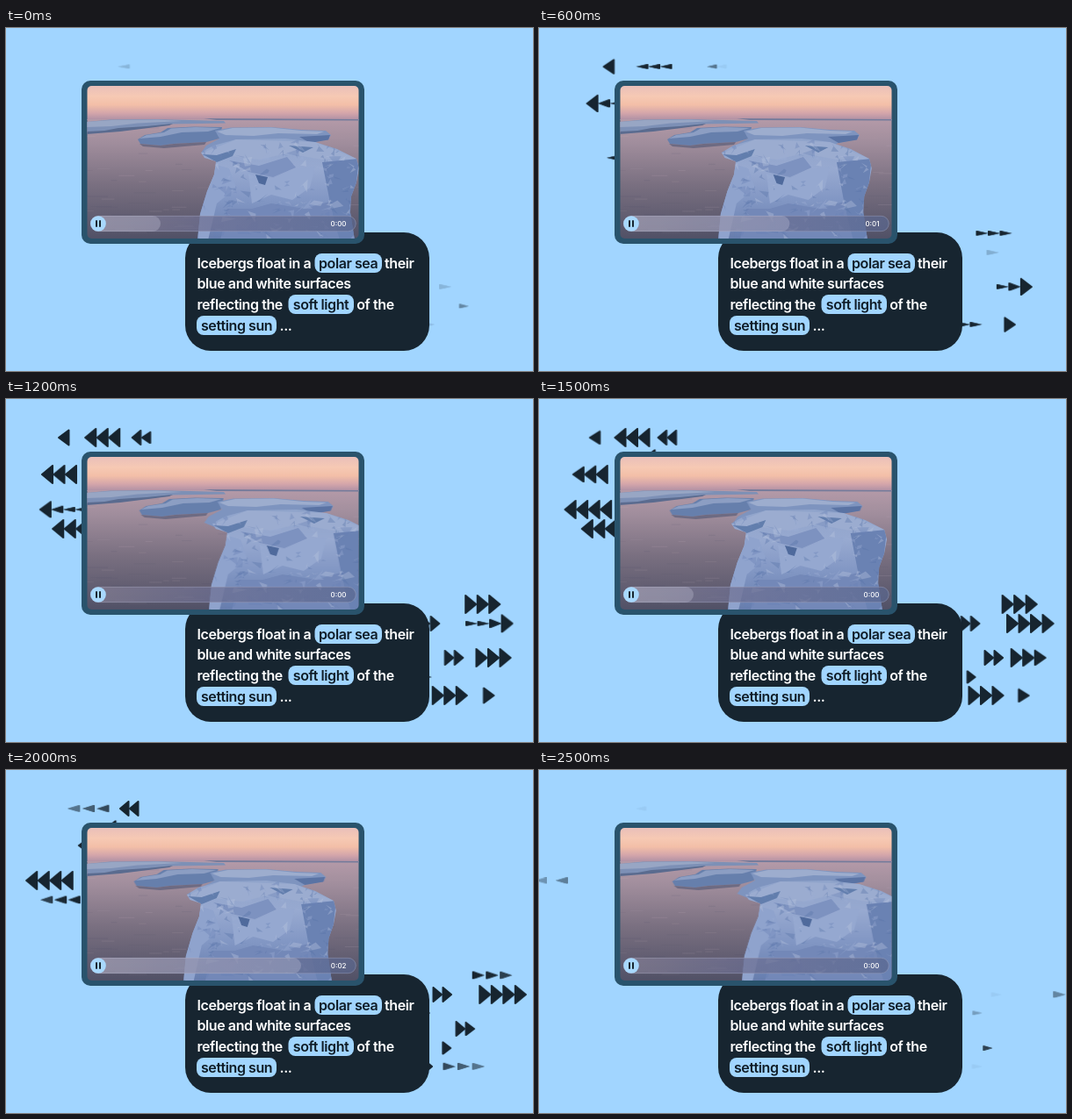
An HTML page that plays this animation: 600x391 px, repeating every 2600 ms.

```html
<!DOCTYPE html>
<html lang="en">
<head>
<meta charset="utf-8">
<title>Polar sea caption</title>
<style>
html, body { margin: 0; width: 100%; height: 100%; overflow: hidden; background: #a1d5ff; }
svg { display: block; width: 100vw; height: 100vh; }

/* arrows: each row glides to rest while its triangles open, then they close and leave */
.glide, .enter, .leave { animation: 2600ms linear infinite; }
.glide { animation-name: glide; }
.leave { animation-name: leave; }
.enter {
  animation-name: enter;
  fill: #172530; stroke: #172530; stroke-width: 2; stroke-linejoin: round;
}
@keyframes glide {
  0% { transform: translateX(-84px); }
  3.85% { transform: translateX(-65px); }
  7.7% { transform: translateX(-51px); }
  11.5% { transform: translateX(-39.5px); }
  15.4% { transform: translateX(-31px); }
  21.2% { transform: translateX(-22.3px); }
  26.9% { transform: translateX(-16px); }
  34.6% { transform: translateX(-9.8px); }
  42.3% { transform: translateX(-5.8px); }
  53.8% { transform: translateX(-2.5px); }
  65.4%, 100% { transform: translateX(-1.2px); }
}
@keyframes enter {
  0%, 1.5% { opacity: 0; transform: scaleY(.26); }
  6.2% { opacity: 1; }
  22.3% { transform: scaleY(.26); }
  25.8% { transform: scaleY(1); }
  94% { opacity: 1; }
  95%, 100% { opacity: 0; transform: scaleY(1); }
}
@keyframes leave {
  0%, 58.1% { transform: none; }
  65% { transform: scaleY(.42); opacity: 1; animation-timing-function: cubic-bezier(.4, .2, .7, .65); }
  66.9% { opacity: 1; }
  76.5%, 100% { transform: translateX(var(--out)) scaleY(.27); opacity: 0; }
}

/* video: a 1300 ms clip that restarts 150 ms before the loop point */
.clip { animation: 1300ms linear -150ms infinite; }
.front { animation-name: front; }
.plate { animation-name: plate; }
.floe { animation-name: floe; }
.fill { animation-name: fill; }
@keyframes front {
  0% { transform: translateX(15px); }
  3.8% { transform: translateX(13px); }
  11.5% { transform: none; }
  26.9% { transform: translateX(-3px) scaleX(.984); }
  50% { transform: translateX(-10px) scaleX(.962); }
  57.7% { transform: translateX(-14px) scaleX(.95); }
  88.5% { transform: translateX(-22px) scaleX(.929); }
  100% { transform: translateX(-24px) scaleX(.92); }
}
@keyframes plate {
  0% { transform: translateX(4px); }
  11.5% { transform: none; }
  57.7% { transform: translateX(-5px); }
  100% { transform: translateX(-9px); }
}
@keyframes floe {
  0% { transform: translateX(2.5px); }
  11.5% { transform: none; }
  57.7% { transform: translateX(-4px); }
  100% { transform: translateX(-6.5px); }
}
@keyframes fill {
  0%, 4.6% { width: 0; }
  11.5%, 30.8% { width: 80px; }
  43%, 53.8% { width: 160px; }
  64.6%, 100% { width: 240px; }
}
.time { font: 500 8px Inter, Roboto, sans-serif; fill: #fff; text-anchor: end; animation-timing-function: step-end; }
.s0 { animation-name: s0; }
.s1 { animation-name: s1; }
.s2 { animation-name: s2; }
@keyframes s0 { 0% { opacity: 1; } 37%, 100% { opacity: 0; } }
@keyframes s1 { 0% { opacity: 0; } 37% { opacity: 1; } 61%, 100% { opacity: 0; } }
@keyframes s2 { 0% { opacity: 0; } 61%, 100% { opacity: 1; } }

.copy { font: 600 16px Inter, Roboto, sans-serif; letter-spacing: -.42px; fill: #fff; }
.copy rect { fill: #a1d5ff; }
.copy .key { fill: #0f1c26; text-anchor: middle; }
</style>
</head>
<body>
<svg viewBox="0 0 600 391" preserveAspectRatio="none">
  <defs>
    <linearGradient id="sky" x2="0" y2="1">
      <stop offset="0" stop-color="#e9bfba"/><stop offset=".3" stop-color="#f6c9b4"/>
      <stop offset=".55" stop-color="#f3bfa8"/><stop offset=".8" stop-color="#d3a5aa"/>
      <stop offset="1" stop-color="#ad8fa4"/>
    </linearGradient>
    <linearGradient id="sea" x2="0" y2="1">
      <stop offset="0" stop-color="#b49aa8"/><stop offset=".2" stop-color="#a08d9c"/>
      <stop offset=".55" stop-color="#796f80"/><stop offset="1" stop-color="#505066"/>
    </linearGradient>
    <linearGradient id="ice" x2="0" y2="1">
      <stop offset="0" stop-color="#90a4cb"/><stop offset=".3" stop-color="#97a9d0"/>
      <stop offset=".6" stop-color="#8297c4"/><stop offset="1" stop-color="#667cac"/>
    </linearGradient>
    <linearGradient id="bar">
      <stop offset="0" stop-color="#857f93"/><stop offset=".45" stop-color="#6d6f92"/>
      <stop offset="1" stop-color="#5a678f"/>
    </linearGradient>
    <clipPath id="screen"><rect x="92.5" y="66" width="309" height="174" rx="5"/></clipPath>
    <clipPath id="track"><rect x="96" y="214" width="302.5" height="18" rx="9"/></clipPath>
    <path id="berg" d="M222 142 L236 134 L262 127 L318 126 L352 130 L377 138 L399 149 L402 160 L399 176 L393 192 L392 210 L397 242 L218 242 L221 212 L229 186 L237 167 L239 152 L226 148 Z"/>
    <clipPath id="bergClip"><use href="#berg"/></clipPath>
  </defs>

  <rect width="600" height="391" fill="#a1d5ff"/>
  <g id="arrows"></g>

  <rect x="204" y="233" width="278" height="135" rx="29" fill="#172530"/>
  <g class="copy">
    <rect x="351.5" y="257" width="76.5" height="22" rx="8"/>
    <rect x="321.5" y="304" width="74.5" height="22" rx="8"/>
    <rect x="217" y="328" width="91" height="22" rx="8"/>
    <text x="217.5" y="273.7">Icebergs float in a</text>
    <text class="key" x="389.7" y="273.7">polar sea</text>
    <text x="431" y="273.7">their</text>
    <text x="217.5" y="297.2">blue and white surfaces</text>
    <text x="217.5" y="320.8">reflecting the</text>
    <text class="key" x="358.6" y="320.8">soft light</text>
    <text x="399.3" y="320.8">of the</text>
    <text class="key" x="262.6" y="344.7">setting sun</text>
    <text x="311.5" y="344.7">...</text>
  </g>

  <rect x="86" y="60" width="322" height="186" rx="10" fill="#29536c"/>
  <g clip-path="url(#screen)">
    <rect x="92" y="66" width="310" height="39" fill="url(#sky)"/>
    <rect x="92" y="104" width="310" height="137" fill="url(#sea)"/>
    <path d="M225 103 L402 104 V105.5 L240 105 Z" fill="#747b9b"/>
    <g id="ripples"></g>
    <path d="M92 107 L118 104.5 L170 104 L248 106 L250 108.5 L190 109.5 L160 113 L128 115 L110 119 L92 119 Z" fill="#7d90b6"/>
    <path d="M92 107 L120 105 L172 104.5 L200 106 L150 108.5 L120 112 L92 113 Z" fill="#98a6c4"/>
    <path d="M92 118 L112 117 L128 114 L160 112 L190 109 L186 111 L130 118 L92 121 Z" fill="#5a6b8f"/>

    <g class="clip floe">
      <path d="M150 127 L158 122 L176 119 L184 114 L214 112.5 L246 113 L243 126 L228 130 L190 132 L176 134 L153 132 Z" fill="#667fac"/>
      <path d="M152 126 L160 122 L180 119 L188 114.5 L216 113 L244 114 L230 118 L200 119 L176 124 Z" fill="#8c9ec3"/>
      <path d="M152 132 L176 134 L191 132 L228 130 L226 133 L180 137 L156 135 Z" fill="#5b5d78" opacity=".7"/>
    </g>
    <g class="clip plate">
      <path d="M223 141 L228 134 L243 126 L238 117 L256 113.5 L302 113 L336 116 L364 117 L370 122 L367 127 L346 131 L322 142 L240 148 Z" fill="#7e94bf"/>
      <path d="M240 118 L258 114 L302 113.5 L336 117 L362 118 L354 121 L310 120 L282 123 L250 122 Z" fill="#9dadce"/>
      <path d="M334 124 L369 122 L367 127.5 L346 131 Z" fill="#5a73a4"/>
    </g>
    <g class="clip front" style="transform-origin:218px 0">
      <use href="#berg" fill="url(#ice)"/>
      <g clip-path="url(#bergClip)">
        <path d="M222 143 L262 127 L352 130 L399 149 L360 150 L320 143 L288 150 L256 146 L238 150 Z" fill="#9bacd0"/>
        <path d="M240 156 L254 160 L262 182 L240 200 L230 242 H216 L221 200 Z" fill="#8fa3cd"/>
        <path d="M254 151 L288 157 L320 147 L330 159 L304 170 L276 164 Z" fill="#7d92c0"/>
        <path d="M360 153 L402 149 L398 184 L391 202 L398 242 H378 L368 194 Z" fill="#6a82b3"/>
        <path d="M276 166 L304 171 L330 160 L352 158 L346 182 L326 196 L302 190 L280 200 Z" fill="#95a8d0"/>
        <path d="M252 206 L280 206 L302 200 L340 206 L368 198 L380 242 H244 Z" fill="#7388b8"/>
        <path d="M284 167 L298 170 L295 179 L288 177 Z" fill="#4f6a9c"/>
        <path d="M224 144 L240 145 L262 138 L258 146 L240 153 Z M322 134 L350 136 L338 142 Z" fill="#627ead"/>
        <g id="facets"></g>
      </g>
    </g>

    <g clip-path="url(#track)">
      <rect x="96" y="214" width="303" height="18" fill="url(#bar)" opacity=".72"/>
      <rect class="clip fill" x="96" y="214" width="80" height="18" rx="9" fill="#cfd0e2" opacity=".28"/>
    </g>
    <rect x="96.3" y="214.3" width="302" height="17.4" rx="8.7" fill="none" stroke="#c6c9dd" stroke-opacity=".4" stroke-width=".7"/>
    <circle cx="105" cy="223" r="8.8" fill="#a8d8fd"/>
    <path d="M103 219.2 V226.8 M107 219.2 V226.8" stroke="#172530" stroke-width="2"/>
    <text class="time clip s0" x="387.5" y="226">0:00</text>
    <text class="time clip s1" x="387.5" y="226">0:01</text>
    <text class="time clip s2" x="387.5" y="226">0:02</text>
  </g>
</svg>
<script>
const make = (parent, tag, attrs) => {
  const el = document.createElementNS('http://www.w3.org/2000/svg', tag);
  for (const k in attrs) el.setAttribute(k, attrs[k]);
  return parent.appendChild(el);
};
const byId = id => document.getElementById(id);

// direction, tip x at rest, y, count, start ms, scale
const groups = [
  [-1, 55, 44, 1, 0], [-1, 82.5, 44, 3, 210], [-1, 127, 44, 2, 555],
  [-1, 36, 86, 3, 0], [-1, 80, 86, 2, 520],
  [-1, 20, 126, 4, 605], [-1, 44, 148, 3, 285], [-1, 108, 68, 1, 650, 1.13],
  [1, 571.5, 234, 3, 285], [1, 595, 256, 4, 595], [1, 510, 256, 2, 555],
  [1, 485, 277, 1, 650, .8], [1, 579.5, 295, 3, 0], [1, 536, 295, 2, 520],
  [1, 511, 317, 1, 780, .8],
  [1, 560.5, 338, 1, 0], [1, 532.5, 338, 3, 210], [1, 488, 338, 2, 555]
];
const sizes = { 1: [13.5, 19], 2: [11.5, 18], 3: [14, 22], 4: [14, 22] };
const wait = ms => `animation-delay:${ms - 60 - 2600}ms;`;

for (const [dir, x, y, n, start, scale = 1] of groups) {
  const [w, h] = sizes[n].map(v => v * scale);
  const spot = make(byId('arrows'), 'g', { transform: `translate(${x} ${y}) scale(${dir} 1)` });
  const glide = make(spot, 'g', { class: 'glide', style: wait(start) });
  for (let i = 0; i < n; i++) {
    const slot = make(glide, 'g', { transform: `translate(${-i * (w - .5)} 0)` });
    const leave = make(slot, 'g', {
      class: 'leave', style: wait(start + i * 30) + `--out:${n === 4 ? 85 : 30}px`
    });
    make(leave, 'path', {
      class: 'enter', style: wait(start + i * 60),
      d: `M-1 0 L${1 - w} ${1 - h / 2} V${h / 2 - 1} Z`
    });
  }
}

let seed = 7;
const rand = (a, b) => {
  seed = (seed * 16807) % 2147483647;
  return a + (b - a) * seed / 2147483647;
};

for (let i = 0; i < 90; i++) {
  const y = rand(108, 240), len = rand(6, 26);
  make(byId('ripples'), 'path', {
    d: `M${rand(85, 400)} ${y} h${len}`, 'stroke-width': rand(.4, 1.1),
    stroke: i % 2 ? '#c3aebb' : '#4c5068', opacity: .16
  });
}

const shades = ['#b9c4de', '#5872a6', '#9badd3', '#6780b3'];
for (let i = 0; i < 160; i++) {
  const x = rand(216, 400), y = rand(130, 240), r = rand(3, 11);
  const pt = () => `${rand(-r, r)} ${rand(-r, r) * .8}`;
  make(byId('facets'), 'path', {
    transform: `translate(${x} ${y})`, d: `M${pt()} L${pt()} L${pt()} L${pt()} Z`,
    fill: shades[i % 4], opacity: .36
  });
}
</script>
</body>
</html>
```
